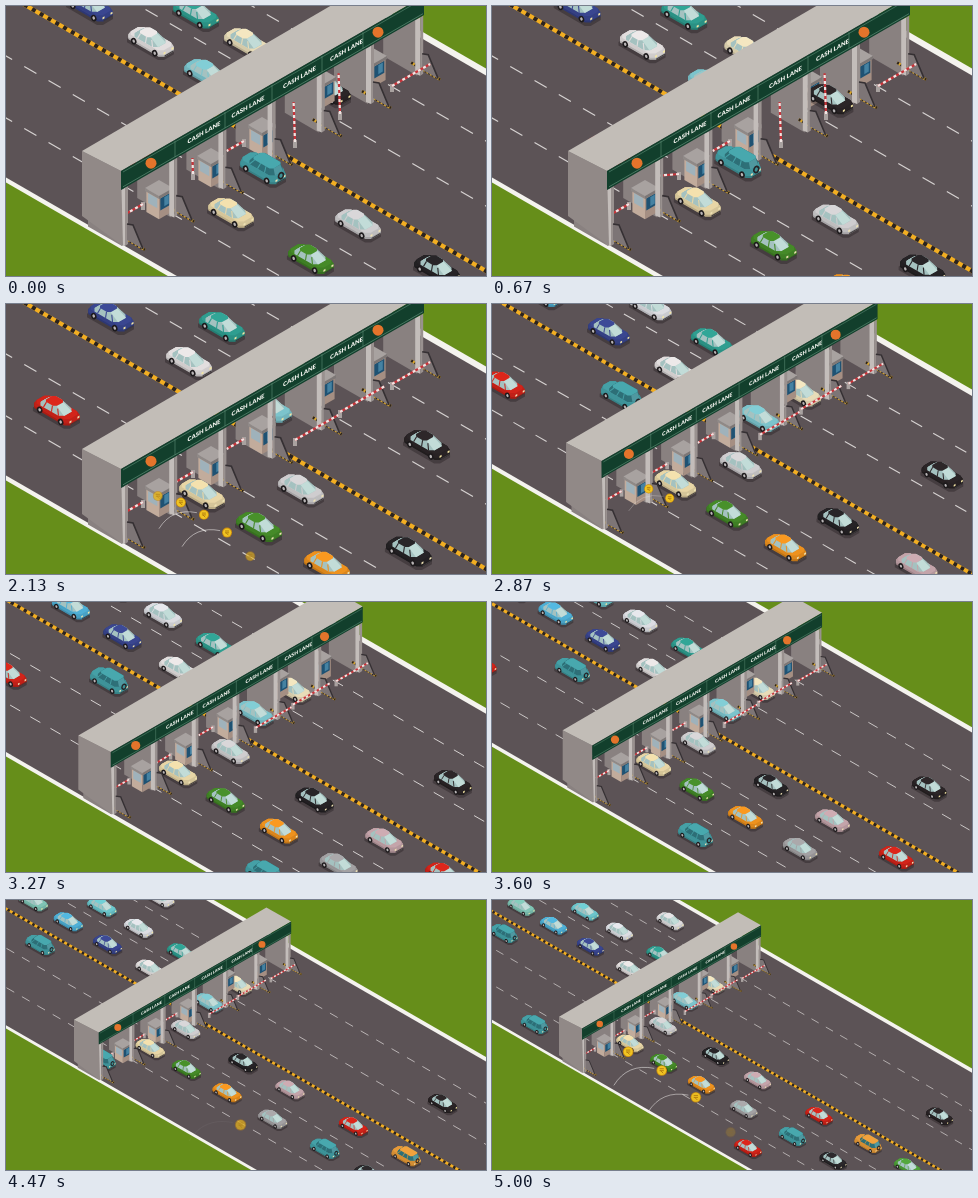
Write an HTML page with a canvas that moves like this. It is 480x270 px and loops after 5070 ms.

```html
<!DOCTYPE html>
<html lang="en">
<head>
<meta charset="utf-8">
<title>Toll plaza</title>
<style>
  html, body { margin: 0; width: 100%; height: 100%; overflow: hidden; background: #668e1a; }
  canvas { display: block; width: 480px; height: 270px; }
</style>
</head>
<body>
<canvas id="stage" width="480" height="270"></canvas>
<script>
const ctx = document.getElementById('stage').getContext('2d');
const LOOP = 5070;
const SLOPE = 0.577;
const TIMES = [0, 1270, 2130, 2870, 3270, 4000, 5000];
const ZOOM = [1, 1, 1, 0.911, 0.832, 0.683, 0.591];
const FOCUS = { x: 54, y: 76 };

// Offset of each lane's centre: y = SLOPE * x + offset
const LANE = { L1: 138, L2: 76, L3: 14, R1: -49, R2: -103, R3: -170 };
const OUTER = [806, 609, 476, 362, 300, 192, 35];

// Lane, colour, body, x at each of TIMES (the last value holds)
const cars = [
  ['L1', '#45a0a6', 'suv', OUTER],
  ['L1', '#d2241a', 'sedan', OUTER.map(x => x + 361)],
  ['L2', '#d2241a', 'sedan', [139, 94, 51, 8, -9, -70, -150]],
  ['L2', '#e8d6a6', 'sedan', [225, 196]],
  ['L2', '#458a28', 'sedan', [305, 265, 253]],
  ['L2', '#ee921e', 'sedan', [378, 340, 321, 317]],
  ['L2', '#a3a1a3', 'sedan', [400, 400, 400, 400, 389]],
  ['L2', '#45a0a6', 'suv', [471]],
  ['L2', '#2b282b', 'sedan', [540]],
  ['L3', '#45a0a6', 'suv', [257, 234, 190, 137, 113, 58, -17]],
  ['L3', '#cfcdcf', 'sedan', [352, 334, 295, 268, 259, 252]],
  ['L3', '#262326', 'sedan', [431, 430, 403, 375, 360, 344, 341]],
  ['L3', '#c4a4aa', 'sedan', [540, 520, 495, 461, 444, 421, 412]],
  ['L3', '#d2241a', 'sedan', [516]],
  ['L3', '#e59a3a', 'suv', [599]],
  ['L3', '#4fa03a', 'sedan', [666]],
  ['R1', '#7cc4cc', 'sedan', [201, 235, 263, 288]],
  ['R1', '#e2dede', 'sedan', [145, 157, 183, 196]],
  ['R1', '#3a4690', 'sedan', [84, 88, 105, 123, 129]],
  ['R1', '#4fb0d6', 'sedan', [40, 40, 40, 50, 67]],
  ['R1', '#7fc4b4', 'sedan', [12]],
  ['R2', '#2b2527', 'sedan', [322, 357, 421, 489, 526, 602, 720]],
  ['R2', '#e8dcb8', 'sedan', [241, 270, 305, 333]],
  ['R2', '#2f9e90', 'sedan', [190, 195, 216, 236, 240, 244, 247]],
  ['R2', '#dcdde2', 'sedan', [60, 80, 140, 169, 178]],
  ['R2', '#6cc6cc', 'sedan', [120]],
  ['R3', '#dcdadc', 'sedan', [-240, -110, -25, 50, 90, 164, 264]]
];

const streams = [
  { start: 1300, gap: 170, count: 7, size: 1, path: [265, 278, 208, 201, 152, 192] },
  { start: 4295, gap: 210, count: 4, size: 1.8, path: [388, 365, 270, 225, 160, 192] }
];
const FLIGHT = 830;

const clamp = v => Math.max(0, Math.min(1, v));
const mix = (a, b, u) => a + (b - a) * u;

// Monotone cubic through the values at TIMES
function track(values, t) {
  const last = TIMES.length - 1;
  const at = i => values[Math.min(i, values.length - 1)];
  const secant = i => (at(i + 1) - at(i)) / (TIMES[i + 1] - TIMES[i]);
  const tangent = i => {
    if (i === 0) return secant(0);
    if (i === last) return secant(last - 1);
    const p = secant(i - 1), q = secant(i);
    return p * q > 0 ? 2 * p * q / (p + q) : 0;
  };
  if (t >= TIMES[last]) return at(last) + secant(last - 1) * (t - TIMES[last]);
  let i = 0;
  while (t >= TIMES[i + 1]) i++;
  const d = TIMES[i + 1] - TIMES[i], u = (t - TIMES[i]) / d, v = 1 - u;
  return at(i) * (1 + 2 * u) * v * v + at(i + 1) * u * u * (3 - 2 * u)
    + d * u * v * (tangent(i) * v - tangent(i + 1) * u);
}

function shade(hex, k) {
  const n = parseInt(hex.slice(1), 16);
  const part = s => Math.min(255, Math.round((n >> s & 255) * k));
  return `rgb(${part(16)},${part(8)},${part(0)})`;
}

function trace(points) {
  ctx.beginPath();
  points.forEach(([x, y]) => ctx.lineTo(x, y));
}

function poly(fill, ...points) {
  trace(points);
  ctx.closePath();
  ctx.fillStyle = fill;
  ctx.fill();
}

function line(color, width, points, dash = []) {
  trace(points);
  ctx.setLineDash(dash);
  ctx.strokeStyle = color;
  ctx.lineWidth = width;
  ctx.stroke();
  ctx.setLineDash([]);
}

function oval(fill, x, y, rx, ry = rx, turn = 0) {
  ctx.beginPath();
  ctx.ellipse(x, y, rx, ry, turn, 0, 7);
  ctx.fillStyle = fill;
  ctx.fill();
}

// a runs along the road, b along the gantry, z upwards
const iso = (a, b, z) => [a + b, SLOPE * (a - b) - z];
const sidePane = (fill, b, a0, a1, z0, z1) =>
  poly(fill, iso(a0, b, z0), iso(a1, b, z0), iso(a1, b, z1), iso(a0, b, z1));
const endPane = (fill, a, b0, b1, z0, z1) =>
  poly(fill, iso(a, b0, z0), iso(a, b1, z0), iso(a, b1, z1), iso(a, b0, z1));

function block(r, z0, z1, side, end, top) {
  poly(top, iso(-r, -r, z1), iso(r, -r, z1), iso(r, r, z1), iso(-r, r, z1));
  sidePane(side, -r, -r, r, z0, z1);
  endPane(end, r, -r, r, z0, z1);
}

// Rectangle [a0, a1, b0, b1] with cut corners
const ring = ([a0, a1, b0, b1], z, cut = 3) => [
  iso(a0 + cut, b0, z), iso(a1 - cut, b0, z), iso(a1, b0 + cut, z), iso(a1, b1 - cut, z),
  iso(a1 - cut, b1, z), iso(a0 + cut, b1, z), iso(a0, b1 - cut, z), iso(a0, b0 + cut, z)
];

// Stack of rings that tapers from lo to hi
function loft(fill, lo, hi, z0, z1) {
  for (let z = z0; z <= z1; z += 0.5) {
    const u = (z - z0) / (z1 - z0);
    poly(fill, ...ring(lo.map((v, i) => mix(v, hi[i], u)), z));
  }
}

function drawCar(x, y, color, body, away) {
  const suv = body === 'suv';
  const deck = suv ? 9 : 7;
  const top = suv ? 15 : 12;
  const waist = suv ? [-10, 16, -6.5, 6.5] : [-13, 11, -6.5, 6.5];
  const roof = suv ? [-6, 14, -5.5, 5.5] : [-8, 3, -5, 5];
  ctx.save();
  ctx.translate(x, y + 5);
  poly('rgba(35,28,30,.4)', ...ring([-18, 19, -9, 7], 0));
  loft(shade(color, 0.8), [-18, 18, -7.5, 7.5], [-18, 18, -7.5, 7.5], 2, 4);
  loft(shade(color, 0.92), [-18, 18, -7.5, 7.5], [-16.5, 16.5, -6.7, 6.7], 4, deck);
  poly(color, ...ring([-16.5, 16.5, -6.7, 6.7], deck));
  for (const a of [-10, 11]) {
    const [wx, wy] = iso(a, -7.3, 3);
    oval('#1d1a1c', wx, wy, 2.7, 3.4, -0.4);
    oval('#b9b5b6', wx, wy, 1.2, 1.7, -0.4);
  }
  loft(suv ? '#2f7078' : '#a5c2c0', waist, roof, deck, top);
  const glass = suv ? '#4f98a0' : '#c2dcd8';
  poly(glass, iso(waist[1], -4, deck), iso(waist[1], 4, deck), iso(roof[1], 3.4, top), iso(roof[1], -3.4, top));
  poly(shade(color, 1.05), ...ring(roof, top, 2));
  for (const a of [-7, 1, 8]) {
    line(color, 1.1, [iso(a, waist[2], deck), iso(mix(a, roof[1] - 4, 0.25), roof[2], top)]);
  }
  const lamp = away ? '#efe2b4' : '#f4e6a4';
  endPane(lamp, 17.5, -5, -3, 4, 6);
  endPane(lamp, 17.5, 3, 5, 4, 6);
  endPane('#3c383a', 18, -4.5, 4.5, 2, 3.2);
  if (suv) {
    const [sx, sy] = iso(18, 0, 8);
    oval('#262326', sx, sy, 3, 4, 0.4);
    oval(shade(color, 0.9), sx, sy, 1.5, 2.2, 0.4);
  }
  ctx.restore();
}

const along = (offset, x0 = -200, x1 = 900) =>
  [[x0, SLOPE * x0 + offset], [x1, SLOPE * x1 + offset]];

function drawRoad() {
  ctx.fillStyle = '#668e1a';
  ctx.fillRect(-200, -200, 1200, 800);
  poly('#5c5356', ...along(-210), ...along(174).reverse());
  line('#f4f3ee', 6, along(-211));
  line('#f4f3ee', 4.5, along(174));
  for (const c of [-142, -77, 50, 112]) line('#d6d2d1', 1.2, along(c), [14, 14]);
  line('#f2ae22', 4.2, along(-12));
  line('#2a2320', 4.2, along(-12), [4, 5]);
}

const signBase = x => 184 - SLOPE * (x - 115);

function drawWall(x, y) {
  const depth = 34, drop = SLOPE * depth;
  poly('#898180', [x - depth, signBase(x)], [x, signBase(x)], [x, y], [x - depth, y - drop]);
  const hazard = [[x - 6, y - 13], [x + 23, y + 4]];
  line('#d9a62c', 2.6, hazard);
  line('#2a2320', 2.6, hazard, [2, 2]);
}

function drawPillar(x, y) {
  poly('#c3bdba', [x - 2, signBase(x - 2)], [x + 3, signBase(x + 3)], [x + 3, y], [x - 2, y - 2]);
  poly('#99918f', [x + 3, signBase(x + 3)], [x + 6, signBase(x + 6)], [x + 6, y - 2], [x + 3, y]);
  const guard = [[x + 5, y - 22], [x + 11, y - 21], [x + 21, y + 3], [x + 5, y - 6]];
  poly('#7d7576', ...guard);
  line('#353033', 1.6, guard.slice(0, 3));
}

function drawBooth(x, y) {
  ctx.save();
  ctx.translate(x, y);
  block(6.3, 0, 22, '#c2ac9c', '#a58f83', '#b5afad');
  sidePane('#9fb2bb', -6.3, -4.6, 4.6, 10, 20);
  endPane('#1f5273', 6.3, -5, 5, 8, 20);
  endPane('#4582a2', 6.3, -1, 3.5, 10, 19);
  block(7, 21, 24, '#8f8987', '#7d7776', '#a8a2a0');
  ctx.restore();
}

function drawBoom(x, y, length, closed, down) {
  const angle = mix(-92, closed, down) * Math.PI / 180;
  const reach = mix(length * 0.8, length, down);
  const bar = [[x, y], [x + reach * Math.cos(angle), y + reach * Math.sin(angle)]];
  ctx.fillStyle = '#a9a2a0';
  ctx.fillRect(x - 2, y - 2, 4, 8);
  line('#c8343a', 2.2, bar);
  line('#efe6e4', 2.2, bar, [3, 3]);
}

function drawGantry() {
  poly('#918987', [76, 145], [115, 165], [117, 240], [76, 210]);
  poly('#c2bdb7', [76, 145], [115, 165], [418, -10], [379, -32]);
  poly('#123f2c', [115, 165], [418, -10], [418, 9], [115, 184]);
  line('#5f8f77', 0.7, [[117, 180.8], [417, 7.7]]);
  line('#5f8f77', 0.6, [[117, 166], [417, -7.2]]);
  for (const x of [169, 219, 266, 316, 357]) line('#5f8f77', 0.6, [[x, signBase(x) - 18], [x, signBase(x) - 2]]);
  for (const x of [145, 372]) oval('#e4742b', x, signBase(x) - 9.5, 5.5);
  ctx.fillStyle = '#f4f5f0';
  ctx.font = '900 6px Lato, "Open Sans", sans-serif';
  ctx.textAlign = 'center';
  ctx.textBaseline = 'middle';
  for (const x of [198, 242, 293.5, 340.5]) {
    ctx.save();
    ctx.transform(1, -SLOPE, 0, 1, x, signBase(x) - 9.5);
    ctx.fillText('CASH LANE', 0, 0);
    ctx.restore();
  }
}

function drawTrail(x, y, size, alpha) {
  ctx.globalAlpha = alpha;
  ctx.beginPath();
  ctx.moveTo(x - 7 * size, y - 2 * size);
  ctx.quadraticCurveTo(x - 32 * size, y - 7 * size, x - 45 * size, y + 14 * size);
  ctx.strokeStyle = '#e9e6e4';
  ctx.lineWidth = size * 0.9;
  ctx.stroke();
  ctx.globalAlpha = 1;
}

function drawCoin(x, y, size, alpha) {
  ctx.globalAlpha = alpha;
  oval('#c98a10', x, y, 5 * size);
  oval('#f0c422', x, y, 4.2 * size);
  for (const dy of [-1.6, 0.2]) line('#a8710c', 0.8 * size, [[x - 2 * size, y + dy * size], [x + 2 * size, y + dy * size]]);
  line('#a8710c', 0.8 * size, [[x - size, y + 0.2 * size], [x + 1.4 * size, y + 2.6 * size]]);
  ctx.globalAlpha = 1;
}

function drawCoins(t) {
  const wisp = 0.5 * Math.sin(Math.PI * clamp((t - 1130) / 300));
  drawTrail(221, 240, 0.7, wisp);
  drawTrail(240, 256, 0.9, wisp);
  for (const { start, gap, count, size, path: p } of streams) {
    for (let i = 0; i < count; i++) {
      const u = (t - start - gap * i) / FLIGHT;
      if (u < 0 || u > 1.05) continue;
      const v = 1 - u;
      const curve = k => v * v * p[k] + 2 * u * v * p[k + 2] + u * u * p[k + 4];
      const x = curve(0), y = curve(1);
      drawTrail(x, y, size, 0.65 * clamp((u - 0.2) * 6) * clamp((0.75 - u) * 6));
      drawCoin(x, y, size, clamp((u - 0.05) * 3) * clamp((1.1 - u) * 6));
    }
  }
}

function draw(t) {
  const s = track(ZOOM, t);
  ctx.setTransform(s, 0, 0, s, FOCUS.x * (1 - s), FOCUS.y * (1 - s));
  drawRoad();

  const items = [];
  const add = (depth, paint) => items.push({ depth, paint });
  for (let i = 0; i < 7; i++) {
    const x = 116 + 49.2 * i, y = 240 - SLOPE * 49.2 * i;
    add(y - 20, () => drawWall(x, y));
    add(y, () => drawPillar(x, y));
  }
  for (const [x, y] of [[153, 206], [205, 174], [256, 143], [316, 95], [367, 74]]) {
    add(y, () => drawBooth(x, y));
  }
  const booms = [
    [137, 198, 20, -210, 1],
    [187, 168, 20, -210, clamp((t - 200) / 600)],
    [238, 135, 20, -210, 1],
    [289, 136, 50, -30, clamp((t - 1150) / 600)],
    [334, 108, 51, -30, clamp((t - 1480) / 580)],
    [386, 80, 44, -30, 1]
  ];
  for (const b of booms) add(b[1], () => drawBoom(...b));
  for (const [lane, color, body, stops] of cars) {
    const x = track(stops, t), y = SLOPE * x + LANE[lane];
    add(y + 5, () => drawCar(x, y, color, body, lane[0] === 'L'));
  }
  items.sort((a, b) => a.depth - b.depth).forEach(item => item.paint());

  drawGantry();
  drawCoins(t);
}

function tick() {
  draw(performance.now() % LOOP);
  requestAnimationFrame(tick);
}
tick();
</script>
</body>
</html>
```
